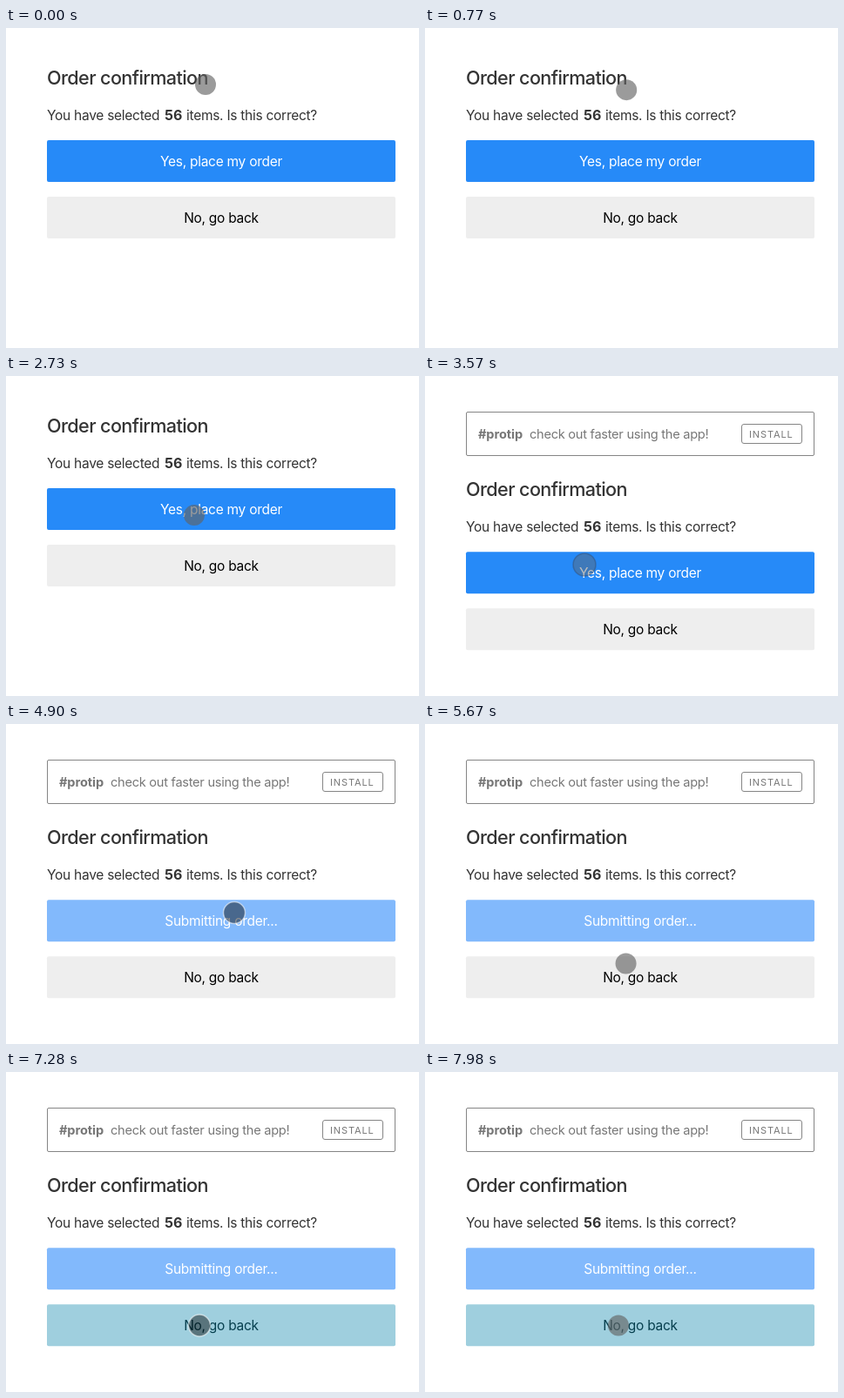
Recreate the animation shown at these times as an HTML page. Size 474 by 368 pixels, loop 8000 ms.

```html
<!DOCTYPE html>
<html lang="en">
<head>
<meta charset="utf-8">
<title>Order confirmation</title>
<style>
  html, body { margin: 0; width: 100%; height: 100%; overflow: hidden; background: #fff; }
  svg { display: block; width: 100vw; height: 100vh; }
  text {
    font: 15.5px Inter, "Open Sans", sans-serif;
    font-optical-sizing: none;
    letter-spacing: -.27px;
    fill: #333;
    white-space: pre;
  }
  .title { font-size: 21.6px; font-weight: 500; letter-spacing: -.6px; }
  .bold { font-weight: 700; }
  .count { font-size: 16px; letter-spacing: 0; }
  .button { text-anchor: middle; }
  #yesLabel { fill: #fff; }
  #banner text { font-size: 14.6px; fill: #777; }
  #banner .bold { letter-spacing: -.1px; }
  #banner .install { font-size: 11px; letter-spacing: .9px; }
  #banner rect { fill: none; stroke: #858585; }
</style>
</head>
<body>
<svg viewBox="0 0 474 368">
  <g id="banner">
    <rect x="47.5" y="41.5" width="399" height="50" rx="1.5"/>
    <text class="bold" x="61" y="72">#protip</text>
    <text x="120" y="72">check out faster using the app!</text>
    <rect x="363.5" y="55.5" width="69" height="22" rx="2.5"/>
    <text class="install" x="372" y="71">INSTALL</text>
  </g>
  <g id="order">
    <text class="title" x="47" y="65">Order confirmation</text>
    <text x="47" y="106">You have selected</text>
    <text class="bold count" x="182" y="106">56</text>
    <text x="207" y="106">items. Is this correct?</text>
    <rect id="yes" x="47" y="129" width="400" height="48" rx="2"/>
    <text id="yesLabel" class="button" x="247" y="159"></text>
    <rect id="no" x="47" y="194" width="400" height="48" rx="2"/>
    <text id="noLabel" class="button" x="247" y="224">No, go back</text>
  </g>
  <circle id="pointer"/>
</svg>
<script>
  const LOOP = 8000, BANNER_AT = 3500, SUBMIT_AT = 3780, CANCEL_AT = 5980;
  const el = id => document.getElementById(id);
  const set = (id, attrs) => {
    for (const name in attrs) el(id).setAttribute(name, attrs[name]);
  };

  // Pointer stops: time, x, y
  const path = [
    [0, 229, 65], [560, 229, 65], [1470, 245, 110], [2300, 245, 110],
    [3200, 183, 217], [4000, 183, 217], [4550, 262, 217], [5180, 262, 217],
    [5880, 222, 291.5], [LOOP, 222, 291.5]
  ];
  const presses = [[3640, 3920], [4620, 5110], [5950, 7440]];

  const idle = { r: 12, fill: 'rgba(98,98,98,.64)', stroke: 'none' };
  const touching = { r: 13, fill: 'rgba(98,98,98,.42)', stroke: 'rgba(50,70,100,.4)' };
  const pressed = { r: 12.5, fill: 'rgba(0,0,0,.44)', stroke: 'rgba(255,255,255,.55)' };

  const ease = p => p * p * (3 - 2 * p);

  function pointerAt(t) {
    const i = path.findIndex(stop => stop[0] > t);
    const [t0, x0, y0] = path[i - 1], [t1, x1, y1] = path[i];
    const p = ease((t - t0) / (t1 - t0));
    return { cx: x0 + (x1 - x0) * p, cy: y0 + (y1 - y0) * p };
  }

  function pointerLook(t) {
    if (presses.some(([from, to]) => t >= from && t < to)) return pressed;
    return t >= BANNER_AT && t < SUBMIT_AT ? touching : idle;
  }

  function draw(now) {
    const t = now % LOOP;
    const shifted = t >= BANNER_AT, submitting = t >= SUBMIT_AT, cancelled = t >= CANCEL_AT;

    set('banner', { visibility: shifted ? 'visible' : 'hidden' });
    set('order', { transform: `translate(0 ${shifted ? 73.3 : 0})` });
    set('yes', { fill: submitting ? '#82b9fc' : '#268af8' });
    el('yesLabel').textContent = submitting ? 'Submitting order...' : 'Yes, place my order';
    set('no', { fill: cancelled ? '#9fcfde' : '#eee' });
    el('noLabel').style.fill = cancelled ? '#063f4e' : '#000';
    set('pointer', { ...pointerAt(t), ...pointerLook(t), 'stroke-width': 1.5 });
  }

  const start = performance.now();
  function tick() {
    draw(performance.now() - start);
    requestAnimationFrame(tick);
  }
  tick();
</script>
</body>
</html>
```
